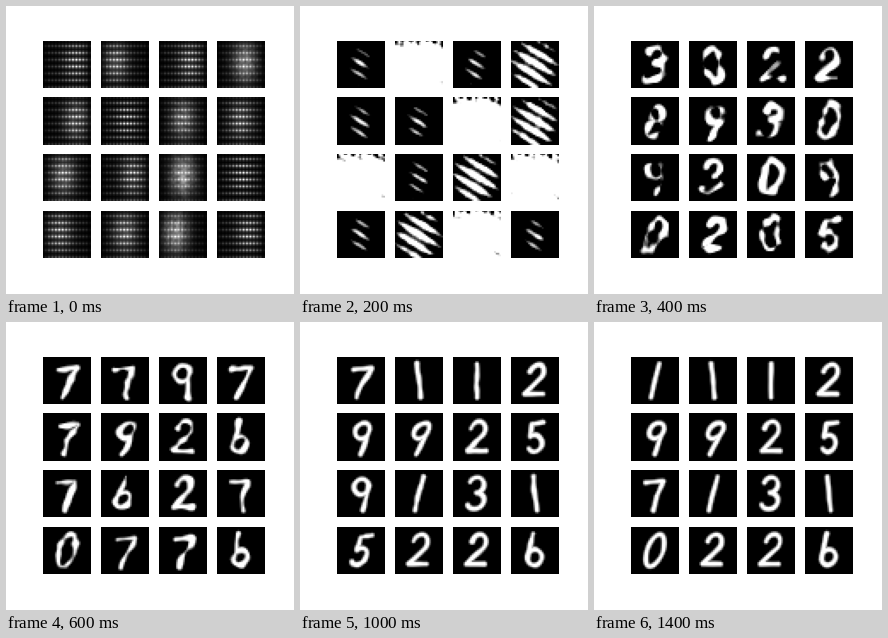
Animation of 288x288 px, one loop 1500 ms. Source, as a matplotlib script:

```python
import numpy as np
import matplotlib.pyplot as plt
from matplotlib.animation import FuncAnimation

SIZE, GRID, FRAMES = 28, 4, 15
Y, X = np.mgrid[0:SIZE, 0:SIZE] + 0.5
rng = np.random.default_rng(5)


def arc(cx, cy, rx, ry, start=0, stop=360):
    a = np.radians(np.linspace(start, stop, 60))
    return np.column_stack([cx + rx * np.cos(a), cy + ry * np.sin(a)])


def line(*points):
    p = np.array(points, float)
    t = np.linspace(0, len(p) - 1, 60)
    return np.column_stack([np.interp(t, range(len(p)), c) for c in p.T])


# Digit skeletons in a box from -1 to 1, y pointing down
NINE = np.vstack([arc(0, -0.4, 0.75, 0.46), line((0.75, -0.5), (0.55, 0.3), (0.4, 1))])
DIGITS = {
    "0": arc(0, 0, 0.85, 0.95),
    "1": line((0, -1), (0, 1)),
    "2": np.vstack([arc(0, -0.45, 0.75, 0.5, 190, 400),
                    line((0.57, -0.13), (-0.85, 0.8), (1.1, 0.8))]),
    "3": np.vstack([arc(-0.1, -0.5, 0.75, 0.46, 200, 450),
                    arc(-0.1, 0.44, 0.9, 0.48, 270, 510)]),
    "5": np.vstack([line((0.7, -0.9), (-0.4, -0.8), (-0.5, -0.1)),
                    arc(0, 0.35, 0.75, 0.5, 230, 500)]),
    "6": -NINE,
    "7": line((-1.1, -0.65), (0.8, -0.75), (0.2, 0.2), (0, 1)),
    "8": np.vstack([arc(0, -0.45, 0.6, 0.43), arc(0, 0.45, 0.7, 0.46)]),
    "9": NINE,
}

# What each tile reads as at every trained step, row by row
READINGS = {
    4: "3022 8930 9309 0205",
    6: "7797 7926 7627 0776",
    8: "7113 9926 9189 6736",
    10: "7112 9925 9131 5226",
    14: "1112 9925 7131 0226",
}
FILL = "0201 0021 2012 0120"  # 0 dark, 1 patchy, 2 saturated
LEAN = [2.5, -1, 0, 2, 2.5, 4, 1, 1, 1, 2.5, 1, -1, 3, 2, 2, 1]
GLOW_X = [19, 9, 18, 16, 19, 15, 14, 14, 12, 18, 14, 15, 10, 14, 10, 18]
HAZE = [0.1, 0.4, 0.2, 1, 0.4, 0, 0.8, 0.3, 0.6, 0.3, 1.8, 0, 0.3, 0.5, 1.5, 0.1]


def noise(scale):
    """Smooth random field between -1 and 1."""
    field = np.zeros((SIZE, SIZE))
    for _ in range(8):
        kx, ky = rng.normal(0, scale, 2)
        field += np.sin(kx * X + ky * Y + rng.uniform(0, 2 * np.pi))
    return field / np.abs(field).max()


def dots(cx, haze):
    """Untrained output: dotted rows under a soft glow."""
    rows = np.array([0.3, 0.06, 0.3, 1.0])[Y.astype(int) % 4]
    cols = np.where(X.astype(int) % 2 == 1, 1.0, 0.4)
    glow = np.exp(-((X - cx) / 7) ** 2 - ((Y - 13) / 12) ** 2)
    edge = np.clip(np.minimum(X, SIZE - X) / 3, 0.3, 1)
    return rows * cols * (0.3 + glow) * edge + haze * glow * (0.7 + 0.3 * noise(1.2))


def bands(fill):
    """Early output: diagonal bands that swell until they flood the tile."""
    level = -0.25 + 0.55 * fill + 0.6 * fill**2
    wave = np.cos(2 * np.pi * (Y - 0.6 * X - 5.5 + rng.uniform(-1, 1)) / 7)
    fall = ((X - 13.5) / (6 + 3.5 * fill)) ** 2 + ((Y - 15) / (11 + fill)) ** 2
    fringe = fill * np.exp(-Y / 2) * (1 + np.cos(2 * np.pi * X / 4.6))
    grain = 0.4 * noise(0.6) + 0.25 * fill * noise(1.5)
    return np.clip(0.3 + level + wave - fall - fringe + grain, 0, 1)


def digit(name, lean, step):
    """A pen stroke whose roughness fades as training goes on."""
    rough = 2 * np.exp((4 - step) / 3) + 0.2
    x, y = DIGITS[name].T
    px = 14 + 5.5 * x - lean * y + 0.5 * rough * np.sin(3 * y + rng.uniform(0, 6))
    py = 14.3 + 9.8 * y
    dist = np.hypot(X[..., None] - px, Y[..., None] - py).min(axis=2)
    return np.clip(0.5 + (1.4 + rough * noise(0.4) - dist) / 1.3, 0, 1)


sheets = {
    0: [dots(cx, haze) for cx, haze in zip(GLOW_X, HAZE)],
    2: [bands(int(f)) for f in FILL.replace(" ", "")],
}
for step, names in READINGS.items():
    sheets[step] = [digit(n, lean, step) for n, lean in zip(names.replace(" ", ""), LEAN)]
STEPS = np.array(list(sheets))
stack = np.array(list(sheets.values()))


def sheet(i):
    """Tiles at step i, blended between neighbours and scaled to full white."""
    at = np.interp(i, STEPS, range(len(STEPS)))
    a = int(at)
    b = min(a + 1, len(STEPS) - 1)
    mix = stack[a] + (at - a) * (stack[b] - stack[a])
    return mix / mix.max(axis=(1, 2), keepdims=True)


fig, axes = plt.subplots(GRID, GRID, figsize=(4, 4), dpi=72, facecolor="white")
fig.subplots_adjust(left=0.125, right=0.9, bottom=0.125, top=0.88, wspace=0.2, hspace=0.2)
images = []
for ax in axes.flat:
    ax.axis("off")
    images.append(ax.imshow(np.zeros((SIZE, SIZE)), cmap="gray", vmin=0, vmax=1))


def update(i):
    for image, tile in zip(images, sheet(i)):
        image.set_data(tile)
    return images


anim = FuncAnimation(fig, update, frames=FRAMES, interval=100, repeat=True, repeat_delay=0)
plt.show()
```
